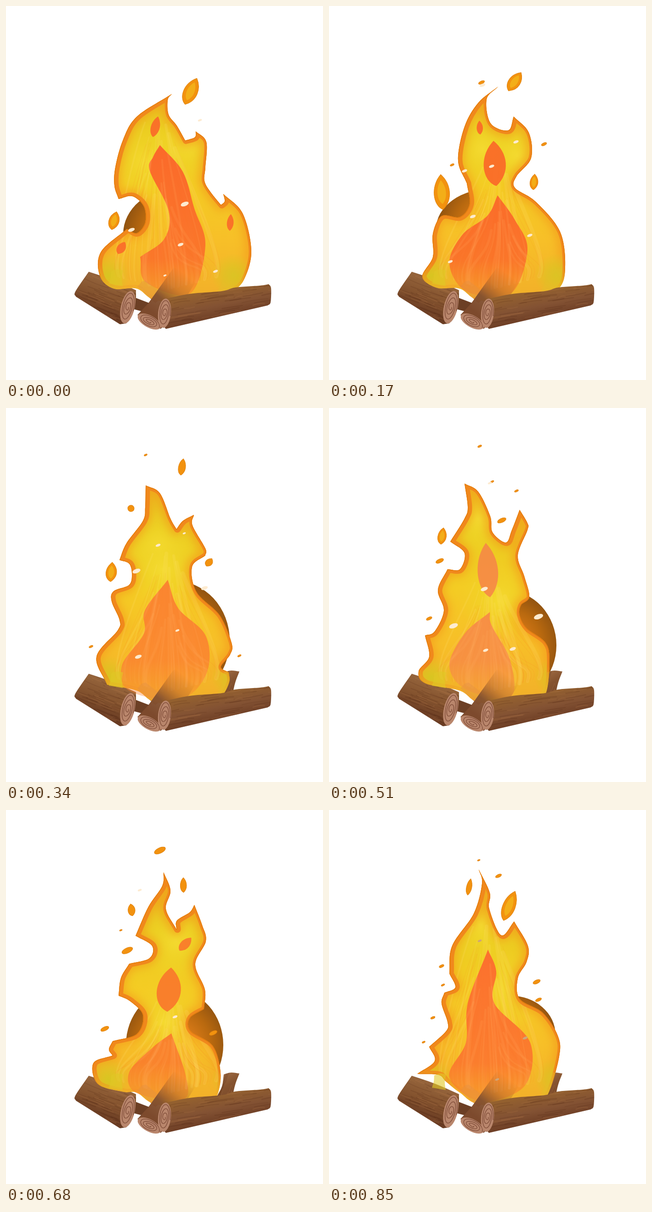
Animation of 690x812 px, one loop 1020 ms. Source, as an HTML page with a canvas:

```html
<!DOCTYPE html>
<html lang="en">
<head>
<meta charset="utf-8">
<title>Campfire</title>
<style>
html, body { margin: 0; width: 100%; height: 100%; overflow: hidden; background: #fff; }
canvas { display: block; }
</style>
</head>
<body>
<canvas id="stage" width="690" height="812"></canvas>
<script>
const ctx = document.getElementById('stage').getContext('2d');
const STEP = 170;
const BASE = '440,640 330,640 285,614';

// Key points of each hand-drawn pose; "!" marks a sharp corner.
// A flame runs down its right side, along BASE and up its left side.
// back: ellipse x,y,rx,ry. Leaves: x,y,w,h,angle. Flecks and specks: x,y,width.
const poses = [
  {
    right: '361,191! 352,204 354,236 372,260 390,292! 411,285 413,272! 436,295 434,350 432,380 446,405 468,432! 476,424 473,408! 515,450 534,530 520,590 495,618',
    left: '235,614 205,588 206,535 263,484! 285,493 303,470 300,435 275,413 245,419! 236,390 238,350 255,290 285,240',
    inner: '335,302! 385,360 410,440 434,520 400,625 305,600 292,545! 345,505 354,445 313,358 320,328',
    back: '375,495,120,100', glow: '305,340 395,300', tone: '251,105,42',
    ember: '325,262,20,46,10 251,525,19,30,25 488,470,15,36,0',
    spark: '402,185,31,62,20 235,466,23,40,10',
    fleck: '389,430,18 273,486,15 380,518,13 456,576,11 346,585,7 422,248,9'
  },
  {
    right: '368,175! 343,203 352,255 390,270 402,240! 435,275 440,330 408,370 405,395 450,425 503,490 514,570 498,616',
    left: '235,612 203,588 226,545 226,495 245,456 285,458 306,430 300,385! 281,335 295,262 325,210',
    inner: '367,411! 405,465 432,530 395,625 300,620 262,560 290,497 345,455',
    back: '355,484,122,88', glow: '335,310 410,325', tone: '251,102,41',
    ember: '328,264,14,30,-8 360,342,50,98,-8',
    spark: '404,164,26,48,30 245,404,35,76,-8 446,382,18,34,0',
    speck: '332,166,14 468,300,12 268,345,9',
    fleck: '407,295,12 354,348,12 295,358,12 313,457,13 437,498,12 264,555,11 334,172,13'
  },
  {
    right: '304,168! 335,185 358,240 371,263! 385,245 409,232! 406,255 434,305 434,320! 405,345 415,400 465,450 491,510 488,535 468,562 485,574! 486,595 470,625',
    left: '220,601! 197,540 243,483 247,460 230,420 234,398 268,384 274,360 268,338 247,330! 262,294 298,245 303,215',
    inner: '352,373! 375,435 435,495 437,575 380,632 270,615 252,560 300,490 302,440',
    back: '366,505,121,130', glow: '332,300 340,350', tone: '251,129,48',
    spark: '383,128,16,36,5 272,218,14,14,50 229,356,24,42,0 442,335,15,20,30',
    speck: '304,102,7 185,518,9 508,538,8',
    fleck: '284,354,18 331,298,11 388,272,7 432,391,15 373,483,9 288,540,15'
  },
  {
    right: '295,164! 325,182 351,235 356,270 385,292 398,265 415,221! 432,250 432,265 411,320 425,365 436,410 418,428 415,450 430,478 470,508 480,545 472,620',
    left: '210,598 195,572 218,540 209,494! 230,485 250,440 237,395 258,350! 285,350 295,315 264,290! 295,240 302,215',
    inner: '350,443! 354,472 395,550 395,628 300,612 262,560 295,490',
    back: '385,515,110,119', glow: '370,420 325,240', tone: '247,137,70',
    ember: '345,352,46,118,-8',
    spark: '246,278,19,36,4',
    speck: '376,244,20 241,332,18 328,83,9 355,160,8 408,180,9 218,457,13',
    fleck: '271,473,20 338,393,16 456,453,21 341,526,12 400,523,14 350,163,9'
  },
  {
    right: '343,135! 358,175 348,215 371,259! 372,240 400,222 410,206! 427,250 435,285 412,335 433,390 431,432! 400,452 402,480 450,512 467,570 460,620',
    left: '255,612 200,595 190,550 232,533! 224,520 232,502! 285,486 298,445 270,415 245,403! 250,365 268,334! 312,322 318,295 282,273! 310,210 340,165',
    inner: '360,485! 392,580 385,628 285,615 268,570 320,515',
    back: '367,510,106,119', glow: '345,460 370,285', tone: '250,119,44',
    ember: '390,291,20,38,38 354,390,54,96,0',
    spark: '386,163,14,32,-5 273,217,16,26,-15',
    speck: '335,88,26 264,305,25 215,475,19 451,484,18 250,261,6',
    fleck: '368,449,11 291,174,9'
  },
  {
    right: '326,129! 350,180 349,215 375,272 403,242! 433,295 430,330 411,365 415,410 465,440 498,490 501,535 475,620',
    left: '255,590 238,575 192,573! 230,545 218,514! 255,480 258,460 245,420 251,397! 275,385 262,355! 268,295 315,225 333,160',
    inner: '346,303! 364,350 360,420 438,505 425,600 330,632 262,580 298,505 302,420',
    back: '395,488,98,85', glow: '330,250 395,390', tone: '252,112,46',
    spark: '392,208,28,68,18 305,167,12,36,8',
    speck: '369,143,14 326,109,6 245,339,11 248,380,8 452,373,17 456,412,14 226,451,10 206,504,7',
    fleck: '328,284,9 427,495,11 366,585,9', fleckTone: '#cfa679'
  }
];

let seed = 1;
const rnd = (a, b) => {
  seed = (seed * 16807) % 2147483647;
  return a + (b - a) * seed / 2147483647;
};

const rows = text => text ? text.split(' ').map(s => s.split(',').map(parseFloat)) : [];

function curve(text) {
  const pts = text.split(' ').map(s => {
    const [x, y] = s.split(',').map(parseFloat);
    return { x, y, sharp: s.endsWith('!') };
  });
  const n = pts.length, path = new Path2D(), at = i => pts[(i + n) % n];
  const handle = (p, q, from, to) => p.sharp
    ? [p.x + (q.x - p.x) / 3, p.y + (q.y - p.y) / 3]
    : [p.x + (to.x - from.x) / 6, p.y + (to.y - from.y) / 6];
  path.moveTo(pts[0].x, pts[0].y);
  for (let i = 0; i < n; i++) {
    const a = at(i - 1), p = at(i), q = at(i + 1), b = at(i + 2);
    path.bezierCurveTo(...handle(p, q, a, q), ...handle(q, p, b, p), q.x, q.y);
  }
  path.closePath();
  return path;
}

const poly = text => new Path2D('M' + text.replace(/ /g, 'L') + 'Z');

function stops(gradient, colors) {
  colors.forEach((c, i) => gradient.addColorStop(i / (colors.length - 1), c));
  return gradient;
}
const ramp = (x0, y0, x1, y1, ...colors) => stops(ctx.createLinearGradient(x0, y0, x1, y1), colors);
const halo = (x, y, r, ...colors) => stops(ctx.createRadialGradient(x, y, 0, x, y, r), colors);

function fill(path, style) {
  ctx.fillStyle = style;
  ctx.fill(path);
}

function stroke(path, style, width) {
  ctx.strokeStyle = style;
  ctx.lineWidth = width;
  ctx.stroke(path);
}

function inside(path, draw) {
  ctx.save();
  ctx.clip(path);
  draw();
  ctx.restore();
}

function placed(x, y, turn, draw) {
  ctx.save();
  ctx.translate(x, y);
  ctx.rotate(turn * Math.PI / 180);
  draw();
  ctx.restore();
}

function leaf(w, h) {
  const p = new Path2D();
  p.moveTo(w * .1, -h / 2);
  p.bezierCurveTo(w * .65, -h * .2, w * .65, h * .25, -w * .05, h / 2);
  p.bezierCurveTo(-w * .65, h * .35, -w * .65, -h * .2, w * .1, -h / 2);
  return p;
}

function oval(w, h) {
  const p = new Path2D();
  p.ellipse(0, 0, w / 2, h / 2, 0, 0, 7);
  return p;
}

// Wood

const wood = {
  left: curve('180,577! 230,594 283,617! 281,645 262,689! 248,691! 152,631! 151,620'),
  right: curve('341,637! 400,625 470,619 500,611 553,607 572,604! 577,613 576,643 570,650! 348,701! 332,680'),
  stump: curve('474,574! 490,570 508,572! 499,596 493,622! 458,624! 470,600'),
  knot: curve('229,576! 242,572 255,574! 252,590 254,608! 224,603! 228,590'),
  twig: poly('286,609 296,598 304,596 345,628 325,645'),
  middle: poly('286,671 310,645 365,568 425,580 390,636 337,701'),
  rear: poly('278,632 312,645 300,664 277,658')
};

function grain(path, x0, y0, x1, y1, depth, count) {
  const len = Math.hypot(x1 - x0, y1 - y0);
  inside(path, () => placed(x0, y0, Math.atan2(y1 - y0, x1 - x0) * 180 / Math.PI, () => {
    for (let i = 0; i < count; i++) {
      const x = rnd(-10, len), y = rnd(0, depth), run = rnd(15, 65);
      const p = new Path2D();
      p.moveTo(x, y);
      p.quadraticCurveTo(x + run / 2, y + rnd(-3, 3), x + run, y);
      stroke(p, i % 3 ? 'rgba(72,32,14,.17)' : 'rgba(190,130,80,.18)', rnd(1, 3));
    }
  }));
}

function face(x, y, rx, ry, turn) {
  placed(x, y, turn, () => {
    fill(oval(rx * 2, ry * 2), '#b9866c');
    const rings = new Path2D();
    for (let a = 0; a < 19; a += .2) {
      const r = .12 + a / 24 + .03 * Math.sin(a * 2.3);
      rings.lineTo(Math.cos(a) * r * rx, Math.sin(a) * r * ry);
    }
    stroke(rings, '#87543f', 1.6);
  });
}

function backLogs() {
  fill(wood.rear, '#6c3f25');
  fill(wood.twig, ramp(286, 598, 335, 640, '#c08a63', '#8a5634'));
  fill(wood.left, ramp(225, 590, 198, 665, '#97663d', '#85542f', '#6a3c23'));
  grain(wood.left, 180, 577, 283, 617, 75, 60);
  face(265, 654, 15, 36, 13);
  fill(wood.stump, ramp(470, 570, 500, 622, '#a06c44', '#85532f', '#7b4a2a'));
  grain(wood.stump, 510, 572, 490, 625, 40, 14);
}

function frontLogs() {
  fill(wood.middle, ramp(385, 578, 318, 665, 'rgba(150,85,40,0)', 'rgba(150,85,40,.35)', 'rgba(130,80,47,.95)', '#7d4a2d'));
  face(312, 685, 28, 13, 28);
  fill(wood.right, ramp(445, 620, 458, 685, '#93602f', '#835233', '#693a22'));
  grain(wood.right, 340, 638, 576, 602, 95, 80);
  face(345, 667, 14, 32, 6);
}

// Fire

// Fine lines that climb from the base and gather under the tip.
function strands(x, y, count, color, maxWidth) {
  for (let i = 0; i < count; i++) {
    const side = rnd(-1, 1), top = rnd(y - 20, 520), end = x + side * 35;
    const p = new Path2D();
    p.moveTo(350 + side * 115, 615 - Math.abs(side) * 30);
    p.bezierCurveTo(350 + side * 135, 550, x + side * 65, top + 70, end, top);
    stroke(p, color, rnd(1, maxWidth));
  }
}

function fire(pose) {
  const flame = curve([pose.right, BASE, pose.left].join(' '));
  const inner = curve(pose.inner), [[tx, ty]] = rows(pose.inner);
  const tone = a => `rgba(${pose.tone},${a})`;

  const [[bx, by, rx, ry]] = rows(pose.back);
  placed(bx, by, 0, () => fill(oval(rx * 2, ry * 2), halo(0, 0, Math.max(rx, ry), '#e8861c', '#d97a18', '#b9690f', '#8f5210')));

  inside(flame, () => {
    fill(flame, ramp(0, 150, 0, 630, '#e9bd20', '#ebcc20', '#f4cc24', '#f7bf28', '#f2b029'));
    for (const [x, y] of rows(pose.glow)) {
      fill(flame, halo(x, y, 85, 'rgba(245,220,50,.9)', 'rgba(240,214,40,.5)', 'rgba(240,214,40,0)'));
    }
    ctx.save();
    ctx.filter = 'blur(9px)';
    stroke(flame, ramp(0, 540, 0, 600, 'rgba(243,148,25,.55)', 'rgba(243,148,25,0)'), 28);
    ctx.restore();
    for (const x of [222, 495]) fill(flame, halo(x, 585, 48, 'rgba(204,205,30,.7)', 'rgba(204,205,30,0)'));
    strands(tx, ty, 45, 'rgba(244,130,35,.14)', 1.5);
    strands(tx, ty - 60, 18, 'rgba(255,222,110,.16)', 9);
    ctx.translate(2, 0);
    stroke(flame, ramp(0, 560, 0, 612, '#f0881c', 'rgba(240,136,28,.1)'), 15);
    ctx.translate(-2, 0);
    stroke(flame, ramp(0, 570, 0, 605, '#e57c0e', 'rgba(229,124,14,0)'), 3);
  });

  fill(inner, ramp(0, 300, 0, 632, tone(1), tone(.95), tone(.9), tone(.82), tone(.3)));
  inside(inner, () => strands(tx, ty, 22, 'rgba(255,175,100,.13)', 6));
  for (const [x, y, w, h, turn] of rows(pose.ember)) placed(x, y, turn, () => fill(leaf(w, h), tone(.9)));
  return flame;
}

function spark([x, y, w, h = w * .45, turn = -25]) {
  placed(x, y, turn, () => {
    const shape = w < h ? leaf(w, h) : oval(w, h);
    fill(shape, '#f2920f');
    stroke(shape, '#e0800c', 1);
    if (w > 17 && h > 30) fill(leaf(w * .55, h * .68), '#f3ae18');
  });
}

function render(pose) {
  seed = 7;
  ctx.fillStyle = '#fff';
  ctx.fillRect(0, 0, 690, 812);
  ctx.lineJoin = ctx.lineCap = 'round';
  backLogs();
  const flame = fire(pose);
  fill(wood.knot, 'rgba(226,200,38,.6)');
  fill(wood.twig, 'rgba(224,140,70,.35)');
  inside(flame, () => fill(wood.stump, 'rgba(226,190,40,.35)'));
  frontLogs();
  [...rows(pose.spark), ...rows(pose.speck)].forEach(spark);
  for (const [x, y, w] of rows(pose.fleck)) {
    placed(x, y, -20, () => fill(oval(w, w * .5), pose.fleckTone || '#fdebd0'));
  }
}

let shown = -1;
function tick() {
  const now = Math.floor(performance.now() / STEP) % poses.length;
  if (now !== shown) render(poses[shown = now]);
  requestAnimationFrame(tick);
}
tick();
</script>
</body>
</html>
```
